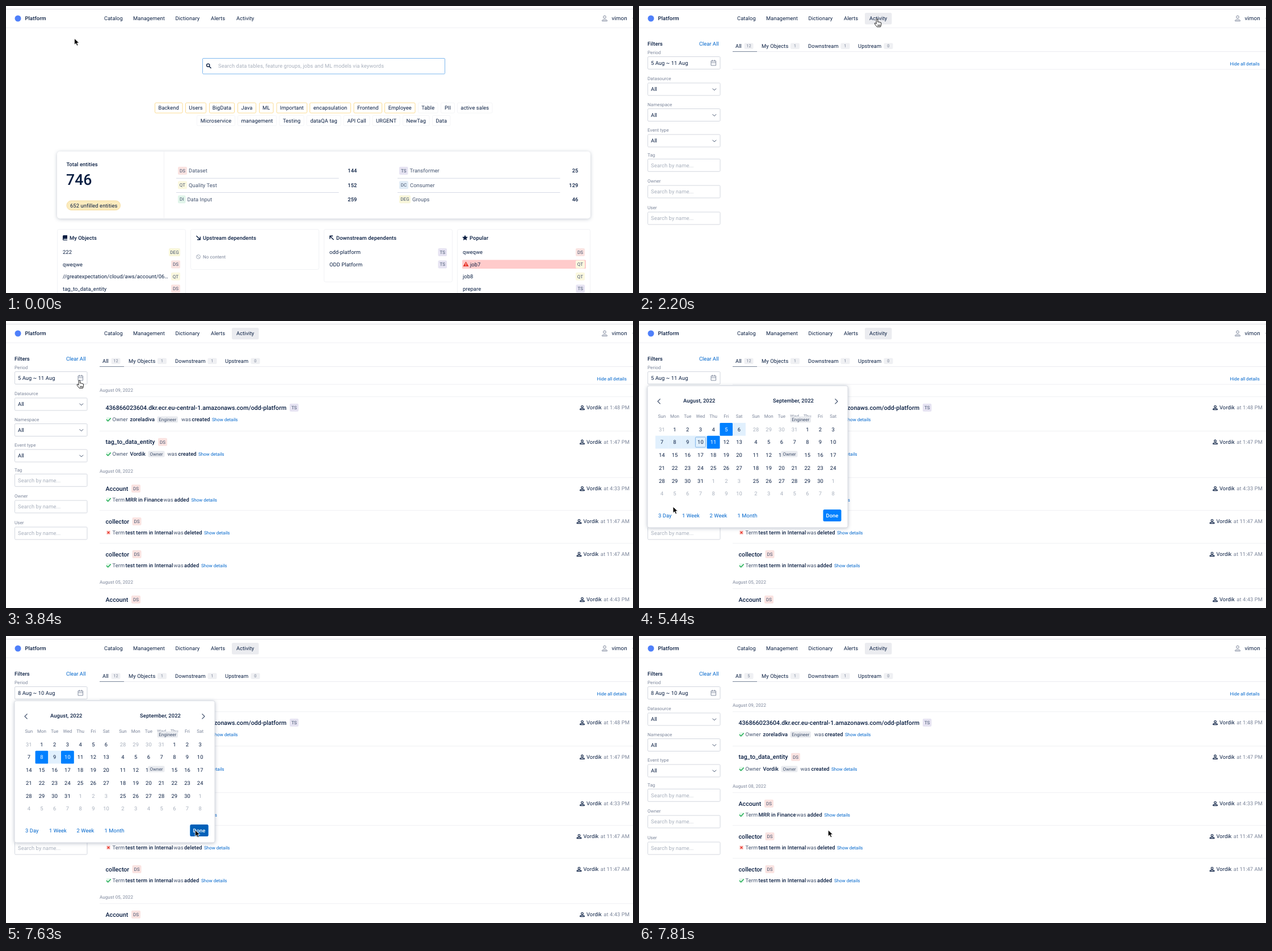
Animation of 1105x507 px, one loop 8 s. Source, as an HTML page:

```html
<!DOCTYPE html>
<html lang="en">
<head>
<meta charset="utf-8">
<title>Activity filter by period</title>
<style>
html, body { margin: 0; width: 100%; height: 100%; overflow: hidden; background: #fff }
svg { display: block; width: 1105px; height: 507px; font-family: Roboto, sans-serif }
text { fill: #091e42; letter-spacing: .01em; text-rendering: geometricPrecision; white-space: pre }
.m { font-weight: 500 }
.n { letter-spacing: 0 }
.g { fill: #7a8499 }
.d { fill: #42526e }
.l { fill: #a8b0bd }
.b { fill: #0066cc }
.w { fill: #fff }
.c { text-anchor: middle }
.e { text-anchor: end }
.shadow { filter: drop-shadow(0 1px 3px #091e4240) }
</style>
</head>
<body>
<svg id="stage" viewBox="0 0 1105 507"></svg>
<script>
const LOOP = 8000, OPEN_PAGE = 2200, LOADED = 2290, OPEN_PICKER = 4650, PICK = 6230, CLOSE = 7720, FILTERED = 7810;
const BADGES = { DS: '#fae3e1', QT: '#fbf8df', DI: '#e1f5ea', TS: '#e6e3f2', DC: '#e1ecf6', DEG: '#f8f6da' };
const BADGE_WIDTHS = { DS: 16, QT: 16, DI: 13.5, TS: 15.5, DC: 16, DEG: 20 };

// Text is placed by the middle of its capitals.
const text = (x, y, label, cls = '', size = 9.33) =>
  `<text x="${x}" y="${y + size * .355}" font-size="${size}" class="${cls}">${label}</text>`;
const rect = (x, y, w, h, fill, stroke = 'none', r = 0, cls = '') =>
  `<rect x="${x}" y="${y}" width="${w}" height="${h}" rx="${r}" fill="${fill}" stroke="${stroke}" class="${cls}"/>`;
const line = (x1, x2, y, color = '#eff0f3') => rect(x1, y - .5, x2 - x1, 1, color);
const stroke = (d, color, width = 1) =>
  `<path d="${d}" fill="none" stroke="${color}" stroke-width="${width}" stroke-linejoin="round"/>`;
const fill = (d, color = '#091e42') => `<path d="${d}" fill="${color}"/>`;
const during = (from, to, content) => `<g data-from="${from}" data-to="${to}">${content}</g>`;
const join = (list, fn) => list.map(fn).join('');

const badge = (x, y, type) => rect(x, y - 7, BADGE_WIDTHS[type], 14, BADGES[type], 'none', 2) +
  text(x + BADGE_WIDTHS[type] / 2, y, type, 'c d', 8);
const chip = (x, y, w, label) => rect(x, y - 5.5, w, 11, '#e9ebef', 'none', 2) + text(x + w / 2, y, label, 'c d n', 8);

function header() {
  return line(0, 1105, 5.5, '#dcdee2') + line(0, 1105, 38.5, '#f0f1f4') +
    '<circle cx="21" cy="22" r="5.5" fill="#4f80fa"/>' + text(33.5, 22, 'Platform', 'm') +
    during(OPEN_PAGE, LOOP, rect(398, 12, 47.5, 20.5, '#ebecf0', 'none', 2.5)) +
    join([[173, 'Catalog'], [224, 'Management'], [298.5, 'Dictionary'], [361, 'Alerts'], [406, 'Activity']],
      ([x, label]) => text(x, 22, label)) +
    '<circle cx="1055" cy="19.5" r="2.3" fill="none" stroke="#7a8499"/>' +
    stroke('M1050.5 26.5v-1q0-1.5 4.500-1.500t4.500 1.500v1z', '#7a8499') +
    text(1067.5, 22, 'vimon', '', 9.8) + fill('M1104 21h1v1.500z', '#7a8499');
}

function home() {
  const important = [[262.5, 48.5, 'Backend'], [316.5, 36, 'Users'], [358.5, 44, 'BigData'], [408.5, 32, 'Java'],
    [446.5, 24.5, 'ML'], [477, 53.5, 'Important'], [535.5, 72, 'encapsulation'], [613, 49.5, 'Frontend'], [667.5, 53.5, 'Employee']];
  const plain = [[726.5, 34.5, 'Table'], [766.5, 24, 'PII'], [795.5, 61.5, 'active sales']];
  const second = [[336.5, 67, 'Microservice'], [408.5, 68, 'management'], [482, 43, 'Testing'], [530, 60, 'dataQA tag'],
    [595, 46, 'API Call'], [646, 48, 'URGENT'], [699.5, 46.5, 'NewTag'], [751.5, 31.5, 'Data']];
  const tags = (list, y, color) => join(list, ([x, w, label]) =>
    rect(x, y - 9, w, 18, '#fff', color, 2) + text(x + w / 2, y, label, 'c'));
  const stats = (x, list) => join(list, ([type, label, count], i) => {
    const y = 291 + i * 25.2;
    return badge(x + 3, y, type) + text(x + BADGE_WIDTHS[type] + 6, y, label, 'd') +
      text(x + 318.500, y, count, 'm e') + (i < 2 ? line(x, x + 286.5, y + 13.3, '#d6dae6') : '');
  });
  const card = (x, w, h, title) => rect(x + .5, 394.5, w, h, '#fff', '#f1f2f5', 3) + text(x + 22, 409.5, title, 'm');
  const items = (x, right, list) => join(list, ([label, type], i) =>
    text(x, 435 + i * 21.4, label) + badge(right - BADGE_WIDTHS[type], 435 + i * 21.4, type));

  return rect(346.5, 92.5, 427, 27.5, '#fff', '#7fb8ee', 1.5) +
    '<circle cx="356.2" cy="104.7" r="2.6" fill="none" stroke="#091e42" stroke-width="1.400"/>' +
    stroke('M358.2 106.700l3.300 3.300', '#091e42', 1.500) +
    text(374, 106, 'Search data tables, feature groups, jobs and ML models via keywords', 'l') +
    tags(important, 180, '#fbdc94') + tags(plain, 180, '#f4f5f7') + tags(second, 202.5, '#f4f5f7') +
    rect(90, 257, 940, 118.5, '#fff', 'none', 5, 'shadow') + rect(278, 257, 1, 118.5, '#f0f1f4') +
    text(106.5, 280, 'Total entities', 'm') + text(106, 306.5, '746', 'm n', 26.67) +
    rect(107, 344, 94.5, 16.5, '#fcebbd', '#f6dda0', 8.2) + text(113, 352.3, '652 unfilled entities') +
    stats(300, [['DS', 'Dataset', 144], ['QT', 'Quality Test', 152], ['DI', 'Data Input', 259]]) +
    stats(690, [['TS', 'Transformer', 25], ['DC', 'Consumer', 129], ['DEG', 'Groups', 46]]) +
    card(90, 226, 120, 'My Objects') + card(325, 226, 71, 'Upstream dependents') +
    card(560, 226, 93, 'Downstream dependents') + card(795, 234, 120, 'Popular') +
    fill('M101.500 405h6.500v6.500h-6q-1 0-1 .700t1 .800h6v1h-6.500q-1.500 0-1.500-1.500v-6q0-1.500 1.500-1.500z') +
    stroke('M335.500 406l6 6M342.300 407.500v5.300h-5.300', '#091e42', 1.4) +
    stroke('M577.500 413l-6-6M570.800 411.500v-5.300h5.300', '#091e42', 1.4) +
    fill('M809 404.500l1.500 3.200 3.500.400-2.600 2.400.700 3.500-3.100-1.700-3.100 1.700.700-3.500-2.600-2.400 3.500-.400z') +
    '<circle cx="339" cy="443" r="3.5" fill="none" stroke="#a8b0bd"/>' + stroke('M336.500 440.500l5 5', '#a8b0bd') +
    text(347, 443, 'No content', 'g', 8) +
    items(100, 307, [['222', 'DEG'], ['qweqwe', 'DS'], ['//greatexpectation/cloud/aws/account/06…', 'QT'], ['tag_to_data_entity', 'DS']]) +
    items(570, 777, [['odd-platform', 'TS'], ['ODD Platform', 'TS']]) +
    rect(804, 448.5, 218, 15.5, '#ffcbcb', 'none', 1.5) +
    items(805, 1020, [['qweqwe', 'DS'], ['', 'QT'], ['job8', 'QT'], ['prepare', 'TS']]) +
    text(818, 456.4, 'job7') + fill('M810.500 451.500l5 8.500h-10z', '#e8352a') +
    rect(810, 454.5, 1, 2.8, '#fff') + rect(810, 458, 1, 1, '#fff');
}

function sidebar() {
  const field = (label, y, value, cls) => text(15, y - 18.5, label, 'g', 8) +
    rect(15.5, y - 11, 127.5, 22, '#fff', '#d3d7df', 1.5) + text(21, y, value, cls);
  const select = (label, y) => field(label, y, 'All') + stroke(`M129.500 ${y - 1.3}l3.300 3.300 3.300-3.300`, '#42526e');
  const search = (label, y) => field(label, y, 'Search by name...', 'l');
  return text(15, 67, 'Filters', 'm') + text(106, 67, 'Clear All', 'b n') +
    field('Period', 100.5, '') + during(OPEN_PAGE, PICK, text(21, 100.5, '5 Aug ~ 11 Aug')) +
    during(PICK, LOOP, text(21, 100.5, '8 Aug ~ 10 Aug')) +
    stroke('M127 97h8.500v8h-8.500zM127 100h8.500M129.200 95v3M133.300 95v3', '#7a8499', .9) +
    select('Datasource', 147) + select('Namespace', 192.5) + select('Event type', 238) +
    search('Tag', 281.3) + search('Owner', 328) + search('User', 375);
}

function tabs() {
  const count = (x, n) => rect(x, 65.5, 16, 10.5, '#eff0f3', 'none', 2) + text(x + 8, 70.8, n, 'c g', 7.5);
  return join([[170, 'All'], [216, 'My Objects'], [298, 'Downstream'], [386, 'Upstream']],
    ([x, label]) => text(x, 71, label)) +
    during(OPEN_PAGE, FILTERED, count(185.5, 12)) + during(FILTERED, LOOP, count(185.5, 5)) +
    count(267, 1) + count(355.5, 1) + count(431.5, 0) +
    line(165, 1105, 80.5, '#ebecf0') + line(165, 208, 80.5, '#7a869a') +
    text(1041.5, 102, 'Hide all details', 'b n', 8) + line(165, 1105, 112);
}

const date = (y, label) => text(165, y, label, 'g', 8);

function event(y, rowY, [title, type, badgeX], time, parts, linkX, removed) {
  const nameX = time.length > 7 ? 1017.5 : 1023, iconX = nameX - 7.5;
  const mark = removed
    ? rect(176.5, rowY - 4, 8, 8, '#fde3e1', 'none', 2) + stroke(`M178.500 ${rowY - 2}l4 4m0-4l-4 4`, '#e8352a', 1.4)
    : rect(176.5, rowY - 4, 8, 8, '#e6f7ec', 'none', 2) + stroke(`M177 ${rowY}l2.700 2.700 5-5.300`, '#1cab50', 1.400);
  return line(165, 1105, y - 19.3) + text(175.5, y, title, 'm n', 10.67) + badge(badgeX, y, type) +
    mark + join(parts, ([x, label, cls = 'd']) => text(x, rowY, label, cls)) +
    text(linkX, rowY, 'Show details', 'b n', 8) +
    `<circle cx="${iconX}" cy="${y - 1.700}" r="1.800" fill="none" stroke="#091e42" stroke-width="1.200"/>` +
    stroke(`M${iconX - 3.8} ${y + 3.6}v-.5q0-1.800 3.800-1.800t3.800 1.800v.5z`, '#091e42', 1.2) +
    text(nameX, y, 'Vordik') + text(1099, y, 'at ' + time, 'g e');
}

function events() {
  const account = ['Account', 'DS', 221], collector = ['collector', 'DS', 222.5];
  const term = (name, wasX, verbX, verb) => [[187.5, 'Term'], [210.5, name, 'm'], [wasX, 'was'], [verbX, verb, 'm']];
  const test = verb => term('test term in Internal', 295.5, 314, verb);
  return date(122.5, 'August 09, 2022') +
    event(153, 174, ['436866023604.dkr.ecr.eu-central-1.amazonaws.com/odd-platform', 'TS', 500], '1:48 PM',
      [[187.5, 'Owner'], [218.5, 'zoreladiva', 'm'], [309, 'was'], [327.5, 'created', 'm']], 363) +
    event(213.7, 235, ['tag_to_data_entity', 'DS', 268], '1:47 PM',
      [[187.5, 'Owner'], [218.5, 'Vordik', 'm'], [284.5, 'was'], [303.5, 'created', 'm']], 339) +
    date(265.5, 'August 08, 2022') +
    event(296, 315.7, account, '4:33 PM', term('MRR in Finance', 277.5, 296.5, 'added'), 326.5) +
    event(354, 373.8, collector, '11:47 AM', test('deleted'), 349, true) +
    event(412, 432, collector, '11:47 AM', test('added'), 344) +
    during(LOADED, FILTERED, date(461.5, 'August 05, 2022') +
      event(492, 511.7, account, '4:43 PM', term('MRR in Finance', 277.5, 296.5, 'added'), 326.5));
}

function month(left, lead, prevLast, length, first, last) {
  let out = '';
  for (let i = 0; i < 42; i++) {
    const day = i - lead + 1, inside = day > 0 && day <= length;
    const x = left + i % 7 * 22.7, y = 191.3 + Math.floor(i / 7) * 22.75;
    const end = inside && (day === first || day === last);
    if (inside && day >= first && day <= last)
      out += rect(x - 11.4, y - 11.4, 22.8, 22.8, end ? '#0080ff' : '#e1f0fd', 'none', end ? 1.5 : 0);
    if (first && day === 10 && !end) out += rect(x - 9, y - 9, 18, 18, 'none', '#7fb3e8', 1.5);
    const label = day < 1 ? prevLast + day : inside ? day : day - length;
    out += text(x, y, label, end ? 'c w' : inside ? 'c' : 'c l');
  }
  return out;
}

function picker() {
  const week = left => join(['Sun', 'Mon', 'Tue', 'Wed', 'Thu', 'Fri', 'Sat'],
    (name, i) => text(left + i * 22.7, 168.5, name, 'c g n', 8));
  const done = color => rect(324.5, 333, 32, 21, color, 'none', 2.5);
  return rect(15, 114.5, 353, 250.5, '#fff', '#d9dce3', 3, 'shadow') +
    text(106.3, 141, 'August, 2022', 'm c') + text(272, 141, 'September, 2022', 'm c') +
    stroke('M37.500 137.500l-4.500 4.500 4.500 4.500M345.500 137.500l4.500 4.500-4.500 4.500', '#42526e', 1.1) +
    week(40.3) + week(206) +
    during(OPEN_PICKER, PICK, month(40.3, 1, 31, 31, 5, 11)) +
    during(PICK, CLOSE, month(40.3, 1, 31, 31, 8, 10)) + month(206, 4, 31, 30) +
    join([[34, '3 Day'], [76, '1 Week'], [124.5, '2 Week'], [173.5, '1 Month']], ([x, label]) => text(x, 344, label, 'b')) +
    done('#0080ff') + during(7370, CLOSE, done('#0060b8')) + text(340.5, 344, 'Done', 'm c w');
}

// Each move: first step, last step, number of steps, destination.
const START = [120.5, 57.3];
const MOVES = [
  [120, 920, 10, 421.5, 21], [1190, 1360, 3, 420.5, 22], [1900, 1900, 1, 419.5, 23],
  [3060, 3490, 6, 126.5, 102], [3670, 3840, 3, 129.3, 104.8],
  [5090, 5440, 5, 60, 328], [5530, 5790, 4, 45, 347], [6670, 7460, 10, 333.3, 342.8]
];
const LINKS = [[398, 12, 445, 33], [121, 92, 141, 112], [26, 333, 62, 355]];

function pointer(t) {
  let [x, y] = START;
  for (const [first, last, steps, toX, toY] of MOVES) {
    if (t < first) break;
    const step = Math.min(steps, 1 + Math.floor((t - first) / ((last - first) / (steps - 1) || 1)));
    const p = step / steps, eased = p * p * (3 - 2 * p);
    x += (toX - x) * eased;
    y += (toY - y) * eased;
  }
  return { x, y, hand: LINKS.some(([l, top, r, b]) => x > l && x < r && y > top && y < b) };
}

const stage = document.getElementById('stage');
stage.innerHTML = rect(0, 0, 1105, 507, '#fff') + header() + during(0, OPEN_PAGE, home()) +
  during(OPEN_PAGE, LOOP, sidebar() + tabs()) + during(LOADED, LOOP, events()) +
  during(OPEN_PICKER, CLOSE, picker()) +
  during(LOADED, LOOP, chip(266.5, 174, 36.5, 'Engineer') + chip(250.5, 235, 29, 'Owner')) +
  `<g id="pointer">
    <path id="arrow" d="M0 0V11.300L2.700 8.800 4.500 13 6.600 12.100 4.800 8H8.400Z" fill="#000" stroke="#fff" stroke-width=".9"/>
    <path id="hand" d="M-1.300 8.500V1.300a1.300 1.300 0 0 1 2.600 0V5.200q1.200-.7 2.200.3 1.200-.5 2 .5 1.800-.3 1.800 1.400V9.500q0 1.800-1.200 4.300h-6.300Q-2 11.500-4 8.800q-.8-1.500.4-1.800 1.200 0 2.300 1.500ZM1.500 10v2.300M3.300 10v2.300M5.100 10v2.300" fill="#fff" stroke="#000" stroke-width=".9" stroke-linejoin="round"/>
  </g>`;

const spans = [...stage.querySelectorAll('[data-from]')];
const [cursor, arrow, hand] = ['pointer', 'arrow', 'hand'].map(id => document.getElementById(id));
const show = (node, visible) => { node.style.display = visible ? '' : 'none'; };

function draw(now) {
  const t = now % LOOP, p = pointer(t);
  for (const span of spans) show(span, t >= +span.dataset.from && t < +span.dataset.to);
  cursor.setAttribute('transform', `translate(${p.x} ${p.y})`);
  show(arrow, !p.hand);
  show(hand, p.hand);
}

const began = performance.now();
function tick() {
  draw(performance.now() - began);
  requestAnimationFrame(tick);
}
tick();
</script>
</body>
</html>
```
